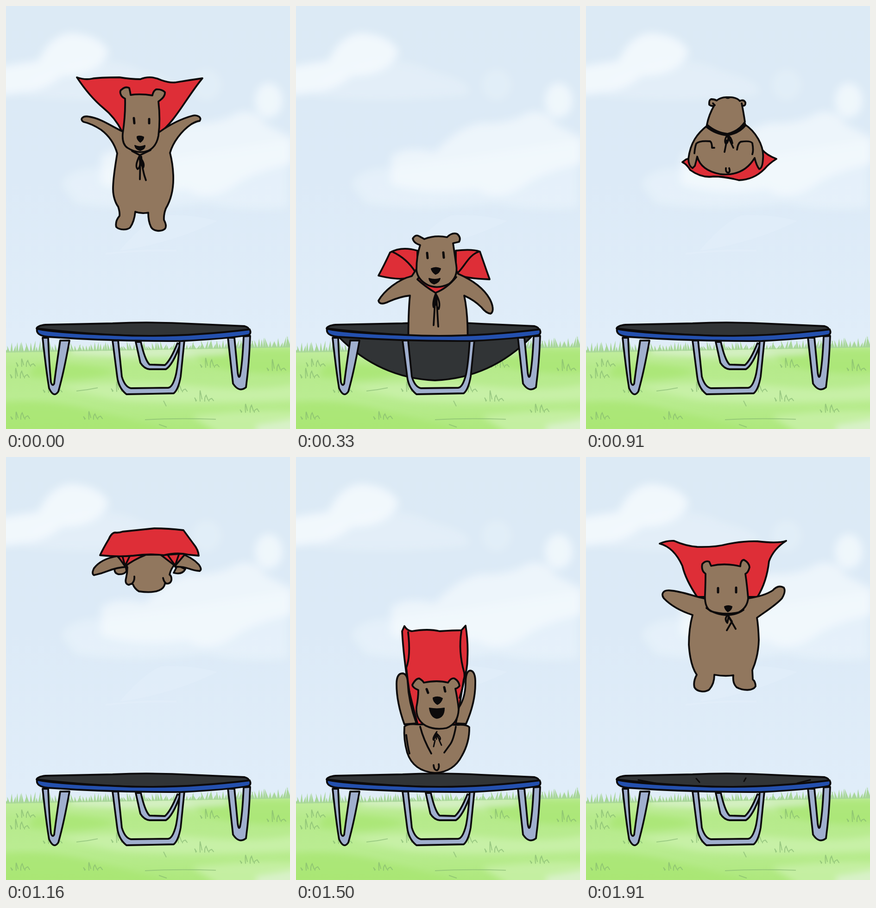
An HTML page for the animation above (2000 ms loop, 613 by 913 pixels).

```html
<!DOCTYPE html>
<html lang="en">
<head>
<meta charset="utf-8">
<title>Trampoline bear</title>
<style>
html, body { margin: 0; width: 100%; height: 100%; overflow: hidden; background: #dceaf6; }
svg { display: block; width: 613px; height: 913px; }
#scene path { stroke: #0c0a0b; stroke-width: 3.8; stroke-linejoin: round; stroke-linecap: round; fill: none; }
#scene .bear { fill: #91775e; }
#scene .red { fill: #de2e37; }
#scene .ink { fill: #0c0a0b; stroke-width: 2; }
#scene .eye { stroke-width: 5; }
#scene .mat { fill: #313436; }
#scene .rim { fill: #2450ae; }
#scene .leg { fill: #a0afce; }
#scene .thin { stroke-width: 3; }
</style>
</head>
<body>
<svg viewBox="0 0 613 913">
  <defs>
    <filter id="soft" x="-30%" y="-50%" width="160%" height="200%"><feGaussianBlur stdDeviation="9"/></filter>
    <filter id="wash" x="-30%" y="-50%" width="160%" height="200%"><feGaussianBlur stdDeviation="7"/></filter>
    <linearGradient id="sky" x2="0" y2="1">
      <stop offset="0" stop-color="#dceaf5"/><stop offset=".4" stop-color="#dceaf7"/>
      <stop offset=".8" stop-color="#e0edf9"/>
    </linearGradient>
    <linearGradient id="lawn" x2="0" y2="1">
      <stop offset="0" stop-color="#c3eda2"/><stop offset=".25" stop-color="#b6ea8b"/>
      <stop offset=".6" stop-color="#baec92"/><stop offset="1" stop-color="#aee87d"/>
    </linearGradient>
  </defs>
  <rect width="613" height="913" fill="url(#sky)"/>
  <g fill="#f7fcfe" filter="url(#soft)">
    <path d="M-20 132L70 118Q95 62 140 58Q205 62 222 100Q200 150 120 150Q75 192-20 192Z" opacity=".8"/>
    <path d="M60 165Q200 90 290 140Q390 165 370 192Q200 210 40 195Z" opacity=".25"/>
    <path d="M205 325Q235 300 300 315Q350 260 400 252Q460 255 500 230Q540 220 560 255L620 285V340Q560 350 510 375Q440 430 390 395Q290 410 205 385Z" opacity=".62"/>
    <path d="M120 385Q135 350 200 350L360 330L610 290V435Q520 445 430 425Q260 445 150 425Z" opacity=".35"/>
    <ellipse cx="567" cy="204" rx="30" ry="38" opacity=".7"/>
    <ellipse cx="433" cy="170" rx="32" ry="34" opacity=".22"/>
  </g>
  <path d="M245 528Q300 465 335 452Q400 448 456 464Q360 512 245 528Z" fill="#e3effa" opacity=".6"/>
  <path d="M215 535Q290 526 368 528" stroke="#e3effa" stroke-width="4" fill="none" opacity=".6"/>
  <path d="M0 745Q150 742 300 740T613 735V913H0Z" fill="url(#lawn)"/>
  <g filter="url(#wash)">
    <path d="M390 742Q500 738 630 738V790Q540 800 430 775ZM60 775Q150 765 240 790Q160 815 50 800ZM-20 858Q90 845 190 875Q300 900 380 925H-20Z" fill="#a8e672" opacity=".75"/>
    <path d="M110 822Q250 805 400 820T630 815V850Q400 862 240 850ZM400 885Q520 870 630 875V930H470Z" fill="#cdf2b0" opacity=".7"/>
    <path d="M140 738H480V750Q300 765 140 750ZM540 905L630 890V930H540Z" fill="#e0f3d9" opacity=".7"/>
  </g>
  <path id="blades" fill="#a8d69a"/>
  <path id="tufts" fill="none" stroke="#83b671" stroke-width="2" opacity=".65" stroke-linecap="round"/>
  <path d="M300 893Q370 889 453 892M330 903L347 909M152 831Q175 829 198 824M340 852L346 864" fill="none" stroke="#83b671" stroke-width="2" opacity=".6"/>

  <g id="scene">
    <path class="leg" d="M280 725L290 770Q298 783 310 784L345 784Q360 775 376 730L370 728Q355 765 343 775L310 774Q300 765 291 725Z"/>
    <path class="mat" d="M66 696Q68 690 85 688L230 685Q310 681 400 686L515 691Q525 694 524 699Q440 712 360 714Q200 712 66 696Z"/>
    <path id="creases" class="thin" d="M113 697L150 704M238 694L245 702M345 693L341 700M484 697L456 704"/>
    <g id="bear"></g>
    <path id="bowl" class="mat"/>
    <path class="leg" d="M79 716Q87 790 93 825Q103 847 113 832Q125 790 137 722L117 722Q107 790 104 815Q100 822 97 812Q93 770 91 716Z"/>
    <path class="leg" d="M479 716L490 815Q503 835 518 823Q525 770 527 712L513 713Q510 775 505 798Q502 806 500 790L493 716Z"/>
    <path class="leg" d="M230 722L240 800Q243 825 260 838L362 836Q372 828 377 800L385 722L375 722Q372 770 367 795Q360 823 350 824L270 825Q257 823 250 800L242 722Z"/>
    <path class="rim" d="M67 697Q110 706 235 710Q370 717 526 698Q530 706 524 710Q480 718 380 723Q230 724 90 714Q64 711 67 697Z"/>
  </g>
</svg>
<script>
const $ = id => document.getElementById(id);

// Each pose lists its layers from back to front: class, path.
const poses = {
  fly: [
    ['red', 'M153 154Q170 160 185 157T245 154Q270 158 290 158Q312 149 335 160Q352 166 365 165Q395 160 424 156C400 185 380 220 360 245Q345 264 331 274L250 270Q235 240 210 220Q180 195 153 154Z'],
    ['bear', 'M250 270C225 258 205 243 180 239C166 236 158 244 167 250Q185 254 205 267C225 282 235 300 240 318C236 345 231 370 231 395C231 410 236 425 242 433Q246 445 245 453Q235 465 238 477C245 484 262 484 268 478Q277 465 279 444Q292 449 307 446Q307 465 313 477C318 486 334 488 343 481Q348 475 341 462Q340 450 345 437C358 415 362 390 361 365Q360 340 354 317C360 295 378 270 400 255Q410 249 418 248C424 240 412 234 402 237C380 243 355 255 331 272Z'],
    ['bear', 'M257 200C246 195 244 183 250 180Q258 173 266 177Q268 185 269 192Q290 189 316 193Q318 183 324 180Q336 179 343 186Q344 195 332 204L329 206C333 240 331 265 329 280Q325 303 308 312Q285 321 262 306Q250 298 252 275Q258 235 257 200Z'],
    ['eye', 'M276 242L277 253M309 244V253'],
    ['ink', 'M283 282Q289 279 297 283Q297 289 290 294Q282 288 283 282ZM278 301Q288 306 300 301Q301 308 290 312Q280 310 278 301Z'],
    ['', 'M272 313L289 322L312 311M289 322Q277 345 284 352Q292 348 288 325Q301 340 296 349Q292 345 290 325L289 374M292 325Q294 355 302 376']
  ],
  land: [
    ['red', 'M249 583Q232 595 178 582Q190 560 203 532Q228 518 262 528V585ZM350 580Q365 588 418 590Q408 562 397 530Q380 524 345 528V580Z'],
    ['', 'M207 530Q240 545 258 575M396 530C375 535 365 560 350 575'],
    ['bear', 'M250 583C220 590 190 615 178 636C180 645 190 643 200 638Q225 627 246 625Q241 670 243 780H368Q375 680 363 625Q385 635 400 650Q410 663 420 664C428 660 425 645 418 632Q400 600 350 578L340 560H265Z'],
    ['red', 'M262 590Q278 605 301 619Q325 610 346 585L320 580H270Z'],
    ['bear', 'M268 516Q254 512 252 502Q258 492 266 497L277 503Q300 494 326 499Q337 488 348 492Q357 500 352 509L339 512Q343 540 346 560Q350 585 330 600Q305 612 284 602Q262 590 260 570Q260 540 268 516Z'],
    ['eye', 'M283 533L284 544M318 532L319 543'],
    ['ink', 'M292 567Q302 562 312 567Q309 577 301 579Q293 573 292 567ZM287 588Q300 592 311 588Q309 597 298 600Q288 597 287 588Z'],
    ['', 'M302 620Q294 640 297 650Q304 645 302 622Q313 640 308 654Q302 650 301 622L297 689M303 625L307 692']
  ],
  stand: [
    ['red', 'M240 500Q240 535 228 559Q240 568 255 565L300 572Q335 572 350 560Q365 565 379 558Q366 535 368 500Z'],
    ['bear', 'M264 378C238 405 230 440 230 475Q232 503 243 503L247 495Q248 530 260 550Q254 565 260 580C275 586 290 583 293 575Q299 562 299 554L317 555Q320 575 327 578C340 582 352 578 358 569Q358 560 350 548Q362 525 363 507Q375 505 375 470C375 430 362 405 344 378L305 400Z'],
    ['', 'M253 430Q246 460 247 497M356 432Q365 470 363 507'],
    ['red', 'M262 370L250 390Q258 378 266 380Q290 400 305 404Q325 397 343 379L355 390L346 368Q330 388 304 391Q275 388 262 370Z'],
    ['bear', 'M267 303Q259 298 263 291Q267 283 273 289L276 296Q303 286 328 294Q332 285 337 289Q344 297 339 303Q342 330 344 352C345 378 325 390 304 391C280 390 262 378 263 352Q266 325 267 303Z'],
    ['eye', 'M284 306L286 313M320 304L321 313'],
    ['ink', 'M295 318Q303 314 310 318Q309 326 303 329Q295 327 295 318ZM293 337Q303 341 312 337Q310 346 302 347Q294 345 293 337Z'],
    ['', 'M305 404Q297 425 301 437Q308 432 305 407Q316 425 313 435L306 438V405L304 473M307 410L311 479']
  ],
  tuck: [
    ['red', 'M208 337L216 331L236 325L380 310Q390 322 411 330Q395 340 385 352Q362 375 330 376Q300 368 275 368Q250 372 225 354Q218 342 208 337Z'],
    ['bear', 'M263 257C240 275 225 295 221 330Q221 345 230 350L235 345Q238 335 240 325Q248 355 290 363Q340 368 364 328Q368 345 374 352Q381 350 382 330C385 300 365 270 342 255Z'],
    ['', 'M277 306H272Q272 295 268 292Q245 290 238 297Q235 305 234 318M326 310Q328 296 334 293Q355 290 359 296Q362 312 359 320M302 350Q301 359 307 360Q312 358 309 350'],
    ['red', 'M261 257Q280 274 305 275Q330 272 343 253L344 258Q330 275 305 279Q280 277 260 261Z'],
    ['bear', 'M277 214Q272 218 266 213Q265 203 270 201Q277 201 282 204Q292 196 306 197Q325 196 332 205Q340 201 344 208Q345 217 337 215Q340 230 343 250Q330 270 305 276Q280 273 261 256Q265 235 277 214Z'],
    ['ink', 'M300 197Q306 202 312 197Z'],
    ['', 'M274 210L278 214M336 210L337 215M305 279Q297 290 302 298Q309 293 306 280Q314 283 316 296M304 290L299 315M308 285L318 306']
  ],
  over: [
    ['bear', 'M235 238Q232 250 242 253Q256 254 260 246L258 234ZM362 250Q380 255 387 242L370 234Z'],
    ['bear', 'M240 214Q205 220 190 240Q184 252 190 255Q205 252 220 246Q240 238 262 237ZM375 208Q400 215 416 232Q424 243 418 246Q405 245 395 241Q380 236 365 237Z'],
    ['bear', 'M250 212L262 238Q262 250 259 262Q256 274 265 276Q273 272 274 275Q278 285 287 290Q315 294 330 288Q342 283 343 273Q355 275 357 266Q358 257 353 254Q356 240 366 230L375 210Z'],
    ['red', 'M240 212L257 236Q275 222 300 212ZM335 212L365 235L388 208Z'],
    ['', 'M251 213L257 235L268 212M348 210L365 234L374 208M277 258Q278 268 271 274M339 261Q341 270 345 272'],
    ['red', 'M236 163Q228 163 222 177Q210 197 203 212Q240 216 275 213Q310 208 340 212Q370 205 395 211L416 213Q415 200 405 188L383 158Q350 154 320 154Q280 158 252 161Q244 164 236 163Z']
  ],
  sit: [
    ['red', 'M229 376L234 365Q240 375 250 376Q285 370 310 376Q340 374 357 374L366 364Q372 400 370 435Q370 460 362 480L345 585H265Q255 550 243 500Q232 430 229 376Z'],
    ['', 'M242 378Q248 430 238 455Q245 520 258 580M357 376Q350 420 363 465Q366 480 353 520'],
    ['bear', 'M234 577Q217 530 217 490Q217 467 230 467Q240 468 241 485Q243 530 260 575ZM367 576Q387 530 387 490Q388 462 376 461Q366 462 366 490Q365 520 352 540L345 575Z'],
    ['bear', 'M262 577Q240 575 234 582Q232 610 240 638Q253 678 300 682Q340 680 358 645Q375 615 374 583Q368 577 350 578Z'],
    ['', 'M238 600Q241 625 245 640M268 582Q275 610 292 640M345 582Q340 610 333 620L320 638M297 665Q298 677 305 676Q310 672 308 663'],
    ['bear', 'M264 503Q252 498 251 492Q258 478 266 478Q273 482 276 487Q305 481 328 487Q335 476 342 478Q352 484 353 494Q348 500 344 500Q350 530 351 545Q350 575 325 585Q300 590 280 580Q258 567 260 540Q264 520 264 503Z'],
    ['eye', 'M282 501L285 509M320 497L322 506'],
    ['ink', 'M296 520Q306 515 316 521Q313 531 305 534Q296 528 296 520ZM288 542Q304 545 320 542Q320 562 304 564Q291 562 288 542Z'],
    ['thin', 'M304 593Q293 608 297 611L304 597Q315 607 310 611L303 598V609M300 612L297 625M309 611L314 622']
  ],
  star: [
    ['red', 'M159 187Q175 180 190 181Q215 192 240 194Q280 195 305 188Q340 181 370 182Q415 187 432 181Q405 198 395 225Q390 270 370 302H240Q215 265 208 235Q190 195 159 187Z'],
    ['bear', 'M255 305C235 302 210 290 180 288C165 287 162 297 168 305Q190 328 230 341Q222 370 222 405Q225 450 239 470Q231 485 234 497C240 508 258 508 266 502Q277 490 277 470Q300 474 318 471Q316 488 325 497C340 505 360 505 366 495Q366 485 360 480L359 460Q372 430 373 395Q372 365 369 347C385 335 410 320 423 305Q432 290 427 282Q415 275 403 288Q385 300 350 305Z'],
    ['bear', 'M258 252Q248 245 251 231Q258 223 266 226L270 235Q300 228 333 236Q334 222 341 222Q352 228 353 238Q350 250 344 252Q348 280 350 305Q348 325 330 335Q300 342 270 333Q255 325 257 295Q258 270 258 252Z'],
    ['eye', 'M285 283V292M324 282V292'],
    ['ink', 'M299 323Q307 319 315 323Q314 330 306 334Q300 329 299 323Z'],
    ['', 'M260 326Q280 341 305 341Q325 341 340 330M305 342Q298 350 305 358L308 344L315 355L304 374M308 345L323 371']
  ]
};

// Twelve steps a second: pose, vertical shift, sag of the mat.
const steps = [
  ['fly', 0, 0], ['fly', 55, 0], ['fly', 150, 0], ['land', -45, .5], ['land', 0, 1], ['land', 0, 1],
  ['land', -50, .4], ['stand', 95, 0], ['stand', 0, 0], ['stand', -55, 0], ['tuck', 20, 0], ['tuck', 0, 0],
  ['tuck', -20, 0], ['over', -4, 0], ['over', 0, 0], ['over', 45, 0], ['sit', -180, 0], ['sit', -80, 0],
  ['sit', 0, 0], ['sit', 95, 1], ['sit', 95, 1], ['sit', 45, .5], ['star', 100, 0], ['star', 0, 0]
];

$('bear').innerHTML = Object.entries(poses).map(([name, layers]) =>
  `<g id="${name}">${layers.map(([c, d]) => `<path class="${c}" d="${d}"/>`).join('')}</g>`).join('');

let seed = 7;
const rand = () => (seed = seed * 16807 % 2147483647) / 2147483647;

let grass = '';
for (let x = -3; x < 613; x += 6) {
  const base = 748 - x / 55;
  const lift = x < 140 || x > 525 ? 10 + rand() * 16 : 8 + rand() * 12;
  grass += `M${x} ${base}L${x + rand() * 12 - 3} ${base - lift}L${x + 6} ${base}Z`;
}
$('blades').setAttribute('d', grass);

const spots = [[27, 803], [98, 834], [28, 892], [185, 892], [437, 780], [425, 853], [523, 877], [581, 787], [245, 832], [368, 833], [40, 778]];
$('tufts').setAttribute('d', spots.map(([x, y]) =>
  [-15, -6, 4, 13].map((dx, i) => {
    const h = [8, 23, 15, 7][i] * (.7 + rand() * .4);
    return `M${x + dx} ${y}Q${x + dx - 1} ${y - h * .6} ${x + dx - 3 + i * 3} ${y - h}l4 ${h * .8}`;
  }).join('')).join(''));

function draw() {
  const t = Math.floor(performance.now() % 2000 / 10) * 10;
  const n = Math.min(23, Math.floor((t + 7) * .012));
  const [pose, dy, sag] = steps[n];
  for (const name in poses) $(name).style.display = name === pose ? '' : 'none';
  $('bear').setAttribute('transform', `translate(0 ${dy})`);
  const depth = 94 * sag;
  $('bowl').style.display = sag ? '' : 'none';
  $('bowl').setAttribute('d', `M92 714Q180 ${714 + depth * .95} 300 ${714 + depth}Q420 ${714 + depth * .95} 508 714Z`);
  $('creases').style.display = n > 21 ? '' : 'none';
  requestAnimationFrame(draw);
}
draw();
</script>
</body>
</html>
```
